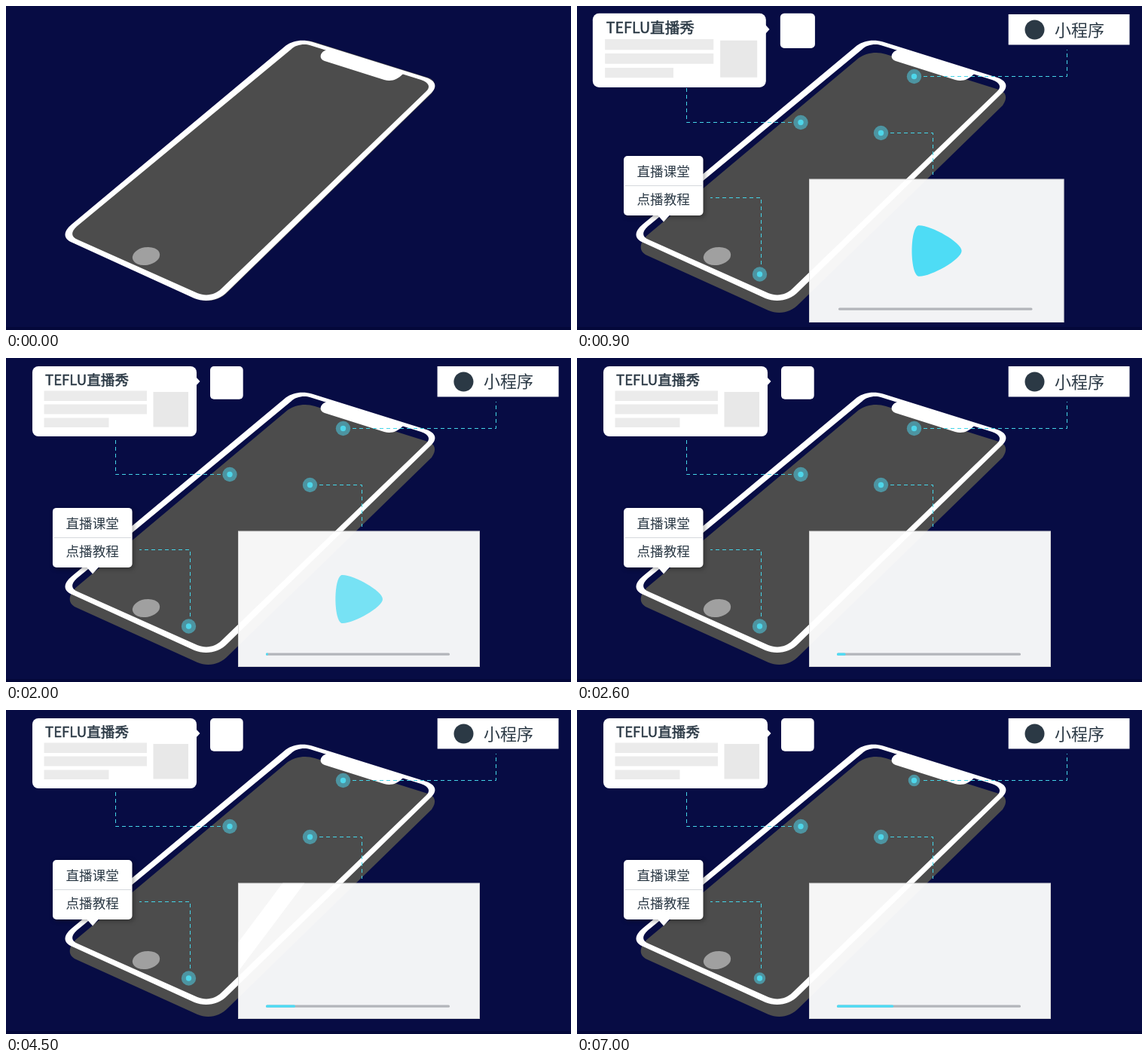
These frames come from a looping animation (750 px wide and 430 px high, 7100 ms). An HTML page with a canvas:

```html
<!DOCTYPE html>
<html lang="zh-CN">
<head>
<meta charset="utf-8">
<title>直播</title>
<style>
html, body { margin: 0; width: 100%; height: 100%; overflow: hidden; background: #070c44; }
canvas { display: block; width: 750px; height: 430px; }
</style>
</head>
<body>
<canvas id="stage" width="750" height="430"></canvas>
<script>
const ctx = document.getElementById('stage').getContext('2d');
const LOOP = 7100, STEP = 100;
const CYAN = '#4edcf5', INK = '#2b3945';
const FONT = '"Noto Sans CJK SC", "Noto Sans CJK", "Noto Sans", sans-serif';

const OUTER = new Path2D('M371.500 52.500C381 45.500 394 44 406 47.500L558 95C570 99 573 107 565 115L294 379C283 391 265 394 250 388L88 314C76 309 75 300 87.500 289.500Z');
const INNER = new Path2D('M378.500 57.500C384 51.500 396 49.500 404 52.300L551 98C562 102 564 108 557 114L286 375C278 383 266 386 254 381L95 310C86 306 86 300 94 292.500Z');
const FRAME = new Path2D(OUTER);
FRAME.addPath(INNER);
const SCREEN = new Path2D('M374 53C384 46 398 44 410 48L560 95C570 98 572 106 565 116L295 379C284 391 268 394 254 388L93 315C82 310 82 299 93 288.500Z');
const NOTCH = new Path2D('M428 58C417 59 414 70 423 73L502 98C512 101 520 97 526 91L530 88Z');
const PLAY = new Path2D('M446 288C460 287 500 309 500 320C500 331 460 353 446 352C434.500 350 434.500 290 446 288Z');

const LINKS = [
  { start: 300, points: [[285, 154.5], [145.5, 154.5], [145.5, 109]] },
  { start: 300, points: [[416, 168.5], [472.5, 168.5], [472.5, 224]] },
  { start: 500, points: [[460, 93.5], [650.5, 93.5], [650.5, 58]] },
  { start: 500, points: [[244.5, 343], [244.5, 254.5], [177, 254.5]] }
];
const DOTS = [
  { x: 297, y: 154.5, delay: 0 },
  { x: 403.5, y: 168.5, delay: 0 },
  { x: 447.5, y: 93.5, delay: 200 },
  { x: 242.5, y: 356, delay: 200 }
];

// Pop-in scale: linear rise, overshoot, settle (ms since start, scale)
const POP = [[0, 0], [500, 1], [650, 1.055], [780, 1.055], [900, 1.015], [1100, 0.992], [1400, 1.003], [1750, 1]];

const ramp = (t, start, span) => Math.min(1, Math.max(0, (t - start) / span));
const easeOut = p => 1 - (1 - p) * (1 - p);

function pop(t) {
  if (t <= 0) return 0;
  for (let i = 1; i < POP.length; i++) {
    const [t0, a] = POP[i - 1], [t1, b] = POP[i];
    if (t < t1) return a + (b - a) * (t - t0) / (t1 - t0);
  }
  return 1;
}

function scaled(x, y, k, draw) {
  if (k <= 0) return;
  ctx.save();
  ctx.translate(x, y);
  ctx.scale(k, k);
  ctx.translate(-x, -y);
  draw();
  ctx.restore();
}

function box(x0, y0, x1, y1, color, radius = 0) {
  ctx.fillStyle = color;
  ctx.beginPath();
  ctx.roundRect(x0, y0, x1 - x0, y1 - y0, radius);
  ctx.fill();
}

function triangle(color, ...p) {
  ctx.fillStyle = color;
  ctx.beginPath();
  for (let i = 0; i < 6; i += 2) ctx.lineTo(p[i], p[i + 1]);
  ctx.fill();
}

function disc(x, y, r, color) {
  ctx.fillStyle = color;
  ctx.beginPath();
  ctx.arc(x, y, r, 0, 7);
  ctx.fill();
}

// A thin outline gives the medium weight
function label(text, x, y, size, outline = 0) {
  ctx.font = `${size}px ${FONT}`;
  ctx.fillStyle = ctx.strokeStyle = INK;
  ctx.fillText(text, x, y);
  if (outline) {
    ctx.lineWidth = outline;
    ctx.strokeText(text, x, y);
  }
}

function phone(t) {
  ctx.save();
  ctx.translate(0, 16 * easeOut(ramp(t, 100, 400)));
  ctx.fillStyle = '#4c4c4c';
  ctx.fill(SCREEN);
  ctx.restore();

  ctx.fillStyle = '#a0a0a0';
  ctx.beginPath();
  ctx.ellipse(186, 332, 18.3, 11.8, -0.17, 0, 7);
  ctx.fill();

  ctx.fillStyle = '#fff';
  ctx.fill(FRAME, 'evenodd');
  ctx.fill(NOTCH);
}

function link({ start, points }, t) {
  const [a, b, c] = points;
  const first = Math.hypot(b[0] - a[0], b[1] - a[1]);
  const total = first + Math.hypot(c[0] - b[0], c[1] - b[1]);
  const length = total * ramp(t, start, 400);
  if (!length) return;
  const along = (p, q, k) => ctx.lineTo(p[0] + (q[0] - p[0]) * k, p[1] + (q[1] - p[1]) * k);
  ctx.strokeStyle = '#45d5e8';
  ctx.lineWidth = 1;
  ctx.setLineDash([5, 4]);
  ctx.beginPath();
  ctx.moveTo(...a);
  along(a, b, Math.min(1, length / first));
  if (length > first) along(b, c, (length - first) / (total - first));
  ctx.stroke();
  ctx.setLineDash([]);
}

function dot({ x, y, delay }, t) {
  const age = t - 500 - delay;
  const phase = age % 3070;
  const halo = age > 0 ? ramp(phase, 0, 200) * (1 - ramp(phase, 2400, 200)) : 0;
  disc(x, y, 9.7 * halo, 'rgba(78,220,245,0.5)');
  disc(x, y, 3.7 * ramp(t, 400 + delay / 5, 400), '#4ed6ea');
}

function showCard() {
  box(35, 11, 253, 104, '#fff', 8);
  triangle('#fff', 252, 25, 257.5, 31, 252, 37);
  label('TEFLU直播秀', 52, 36, 18.6, 0.5);
  box(50.5, 43.5, 187, 57, '#ebebeb');
  box(50.5, 61.5, 187, 74.5, '#ebebeb');
  box(50.5, 79.5, 136.5, 92, '#ebebeb');
  box(195.5, 45, 242, 91.5, '#e8e8e8');
  box(271, 11, 314.7, 54.7, '#fff', 5);
}

function appCard() {
  box(572.7, 11, 733.5, 51.6, '#fff');
  disc(607.5, 31.5, 13, INK);
  label('小程序', 634, 39.5, 22);
}

function menu() {
  ctx.save();
  ctx.shadowColor = 'rgba(0,0,0,0.35)';
  ctx.shadowBlur = 6;
  ctx.shadowOffsetX = ctx.shadowOffsetY = 2;
  box(62, 199, 167.5, 278, '#fff', 5);
  ctx.restore();
  triangle('#fff', 107, 277.5, 123, 277.5, 115, 286.5);
  box(64, 238, 166, 239, '#d5d8dc');
  label('直播课堂', 79.5, 226, 17.6);
  label('点播教程', 79.5, 263, 17.6);
}

function shine(t) {
  const p = ramp(t, 4330, 1000);
  if (p <= 0 || p >= 1) return;
  const x = 308 + 520 * p, drop = 180.5, lean = drop * 0.75;
  ctx.save();
  ctx.beginPath();
  ctx.rect(308, 229.5, 321, drop);
  ctx.clip();
  ctx.fillStyle = '#fff';
  ctx.beginPath();
  ctx.moveTo(x - 29, 229.5);
  ctx.lineTo(x, 229.5);
  ctx.lineTo(x - lean, 229.5 + drop);
  ctx.lineTo(x - 29 - lean, 229.5 + drop);
  ctx.fill();
  ctx.restore();
}

function player(t) {
  box(308, 229.5, 629, 410, 'rgba(255,255,255,0.95)');
  shine(t);
  ctx.strokeStyle = 'rgba(0,0,0,0.12)';
  ctx.lineWidth = 1;
  ctx.strokeRect(308.5, 230, 320, 179.5);
  ctx.globalAlpha = 1 - ramp(t, 1800, 800);
  ctx.fillStyle = CYAN;
  ctx.fill(PLAY);
  ctx.globalAlpha = 1;
  box(345, 391.5, 589, 394.7, '#b3b5ba', 1.5);
  const played = Math.max(0, t - 1800) * 0.01445;
  if (played) box(345, 391.5, 345 + played, 394.7, CYAN, 1.5);
}

function draw(t) {
  ctx.fillStyle = '#070c44';
  ctx.fillRect(0, 0, 750, 430);
  ctx.fillStyle = '#04083a';
  ctx.fillRect(0, 426, 750, 4);

  const early = pop(t - 200), late = pop(t - 400);
  phone(t);
  LINKS.forEach(l => link(l, t));
  DOTS.forEach(d => dot(d, t));
  scaled(292.5, 32.7, early, showCard);
  scaled(308, 229.5, early, () => player(t));
  scaled(115, 286.5, late, menu);
  ctx.globalAlpha = Math.min(1, late);
  scaled(653, 52, late, appCard);
  ctx.globalAlpha = 1;
}

const begin = performance.now();
function tick() {
  const t = (performance.now() - begin) % LOOP;
  draw(Math.floor(t / STEP) * STEP);
  requestAnimationFrame(tick);
}
tick();
</script>
</body>
</html>
```
